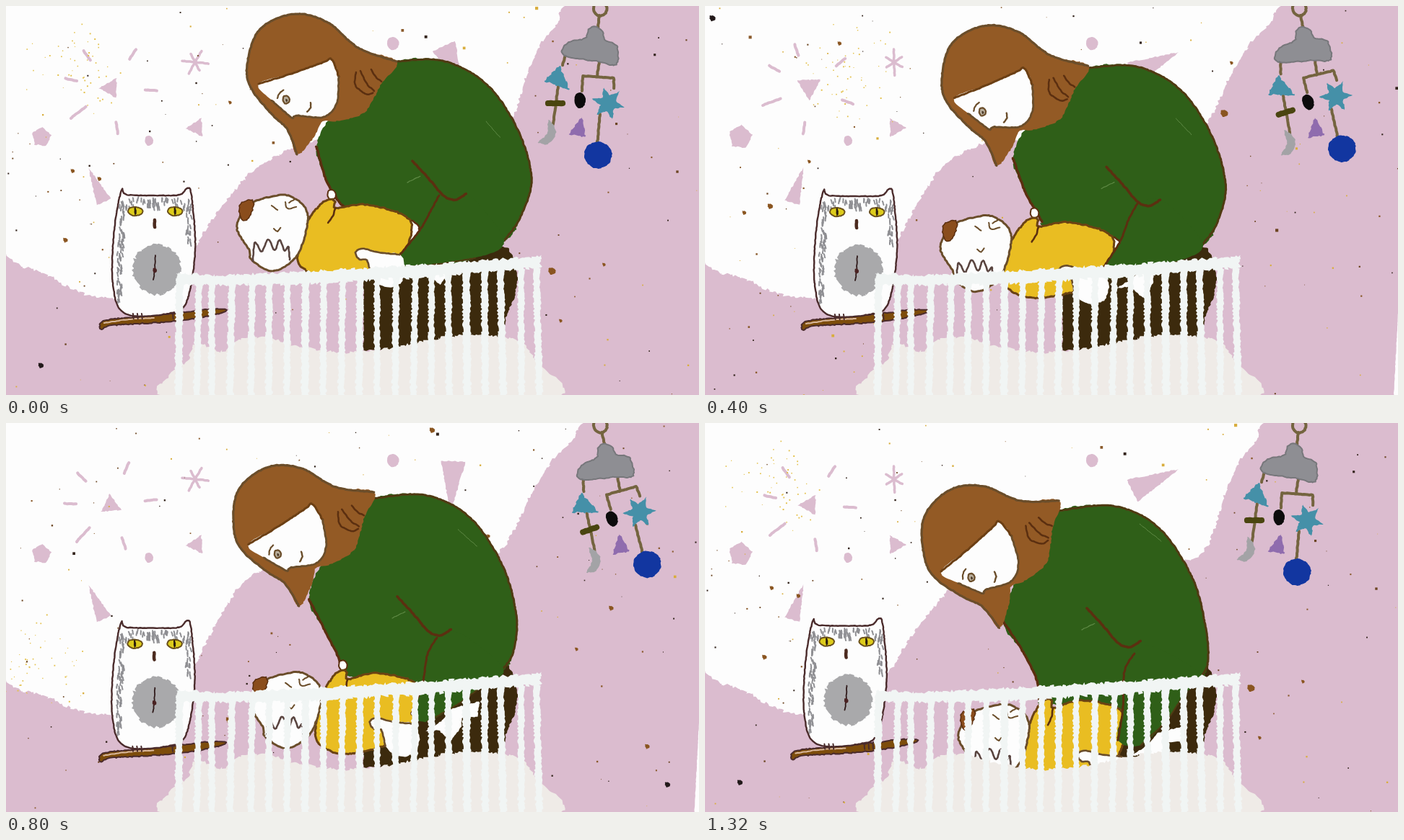
An HTML page with a canvas that plays this animation: 960 px wide and 540 px high, repeating every 1.36 s.

```html
<!DOCTYPE html>
<html lang="en">
<head>
<meta charset="utf-8">
<title>Bedtime</title>
<style>
html, body { margin: 0; width: 100%; height: 100%; overflow: hidden; background: #fdfdfd; }
canvas { display: block; width: 960px; height: 540px; }
</style>
</head>
<body>
<canvas id="stage" width="960" height="540"></canvas>
<script>
const LOOP = 1360, STEP = 40, RAD = Math.PI / 180;
const stage = document.getElementById('stage');
let ctx = stage.getContext('2d');

const C = {
  paper: '#fdfdfd', pink: '#dbbccf', hair: '#935a25', green: '#2f5f18', line: '#5b2f10',
  face: '#6a4d2a', yellow: '#e9bd22', dark: '#3c2a0d', rail: '#f1f5f4', sheet: '#efebe7',
  grey: '#8e8e93', cord: '#74643f', teal: '#4590a8', owl: '#4a2b2b', back: '#4f3a12', scratch: '#5f8a45'
};

// timing
const TIMES = [0, 240, 400, 640, 920, 1120, 1320];
const TRACK = {
  bend: [0, .1, .2, .45, .74, .89, 1],
  swing: [0, .41, .75, 1, .69, .29, 0],
  owlX: [0, 2, 4, 2.5, -3, -5.5, -10.5],
  owlY: [0, -2.5, 1, 15, 26.5, 26.5, 18.5]
};
function at(name, t) {
  const v = TRACK[name];
  let i = 0;
  while (i < TIMES.length - 2 && t >= TIMES[i + 1]) i++;
  const k = (t - TIMES[i]) / (TIMES[i + 1] - TIMES[i]);
  return v[i] + (v[i + 1] - v[i]) * k;
}
const nearest = t => TIMES.reduce((best, v, i) => Math.abs(v - t) <= Math.abs(TIMES[best] - t) ? i : best, 0);

// geometry
const hash = n => { const s = Math.sin(n * 12.9898 + 4.1) * 43758.5453; return s - Math.floor(s); };
function chunk(list, size) {
  const out = [];
  for (let i = 0; i < list.length; i += size) out.push(list.slice(i, i + size));
  return out;
}
const pairs = list => chunk(list, 2);
// entries: x, y at rest, then x, y when fully bent
const mix = (list, k) => chunk(list, 4).map(([x, y, u, v]) => [x + (u - x) * k, y + (v - y) * k]);
// linear bend around an anchor
const warp = (list, m, k) => pairs(list).map(([x, y]) => {
  const u = x - m.x, v = y - m.y;
  return [x + k * (m.dx + m.a * u + m.b * v), y + k * (m.dy + m.c * u + m.d * v)];
});
const ring = (n, x, y, radius, turn = 0) => Array.from({ length: n }, (_, i) => {
  const a = i * 2 * Math.PI / n + turn, r = radius(i);
  return [x + r * Math.cos(a), y + r * Math.sin(a)];
});

function trace(pts, closed, straight, rough) {
  const n = pts.length, last = closed ? n : n - 1;
  const get = i => closed ? pts[(i + n) % n] : pts[Math.max(0, Math.min(n - 1, i))];
  ctx.beginPath();
  for (let i = 0; i < last; i++) {
    const a = get(i - 1), b = get(i), c = get(i + 1), d = get(i + 2);
    const steps = Math.max(2, Math.ceil(Math.hypot(c[0] - b[0], c[1] - b[1]) / 2.5));
    for (let s = 0; s <= steps; s++) {
      if (s === steps && i < last - 1) break;
      const u = s / steps, p = [0, 1].map(j => {
        const jit = (hash(i * 97 + s * 2.3 + j * 31) - .5) * 2 * rough;
        if (straight) return b[j] + (c[j] - b[j]) * u + jit;
        return jit + .5 * (2 * b[j] + (c[j] - a[j]) * u
          + (2 * a[j] - 5 * b[j] + 4 * c[j] - d[j]) * u * u
          + (3 * b[j] - a[j] - 3 * c[j] + d[j]) * u * u * u);
      });
      ctx.lineTo(p[0], p[1]);
    }
  }
  if (closed) ctx.closePath();
}
function ink(color, w) {
  ctx.strokeStyle = color;
  ctx.lineWidth = w;
  ctx.lineCap = ctx.lineJoin = 'round';
  ctx.stroke();
}
function blob(pts, fill, { line, w = 3, rough = .8, straight = false } = {}) {
  trace(pts, true, straight, rough);
  ctx.fillStyle = fill;
  ctx.fill();
  if (line) ink(line, w);
}
const poly = (list, fill, opt) => blob(pairs(list), fill, { straight: true, ...opt });
const shape = (list, fill, opt) => blob(pairs(list), fill, opt);
function stroke(pts, color, w = 3, rough = .4) { trace(pts, false, false, rough); ink(color, w); }
const line = (list, color, w) => stroke(pairs(list), color, w);
const oval = (x, y, rx, ry, fill, opt) =>
  blob(ring(10, 0, 0, () => 1).map(([u, v]) => [x + rx * u, y + ry * v]), fill, { rough: .5, ...opt });
function placed(x, y, turn, paint) {
  ctx.save();
  ctx.translate(x, y);
  ctx.rotate(turn);
  paint();
  ctx.restore();
}

// wall
const EDGE = [
  -10,360, 22,362, 55,372, 90,392, 130,405, 190,400, 255,345, 278,308, 330,240, 370,211, 430,187,
  540,190, 660,191, 696,170, 721,98, 740,55, 764,25, 790,-4, 975,-6, 975,560, -10,560
];
function wall(q) {
  ctx.fillStyle = C.paper;
  ctx.fillRect(0, 0, 960, 540);
  blob(pairs(EDGE).map(([x, y]) => {
    if (y > 550 || x > 900) return [x, y];
    if (x < 130) return [x, y + q * 15 * (1 - x / 130)];
    if (x > 600) return [x + q * 30 * (1 - y / 140), y];
    return [x - q * Math.max(0, Math.min(35, (x - 270) * .33)), y];
  }), C.pink, { rough: 2 });
  poly([960, 540 - 150 * q, 962, 542, 960 - 8 * q, 542], C.paper, { rough: .3 });
}

// wall shapes hold one pose, then jump to the next
const POSE = [0, 1, 1, 2, 0, 1, 1];
const BIG = [66, 25, -25, 120, 93, 66, -25];
const SPIN = [0, 16, 17, 31, -10, 6, 0];
const RAYS = [-126, -57, -168, 3, 143, 81];
function spike(x, y, len, half, deg) {
  placed(x, y, deg * RAD, () => poly([-len * .4, -half, -len * .4, half, len * .6, 0], C.pink));
}
function shards(i) {
  const p = C.pink, wide = [2, 3, 6].includes(i), tall = [1, 2, 6].includes(i);
  const tri = (x, y, r, deg) => blob(ring(3, x, y, () => r, deg * RAD), p, { straight: true });
  blob(ring(5, 49, 182, () => wide ? 17 : 14, -1.45), p, { straight: true });
  if (i === 2 || i === 3) tri(144, 112, 19, 88);
  else tri(145, 114, 16, i === 4 ? -95 : 180);
  tri(264, 169, 15, [176, 0, -90][POSE[i]]);
  spike(127, 253, 52, 11, tall ? -72 : i === 3 ? 198 : -114);
  spike(618, 82, 72, 17, BIG[i]);
  oval(536, 52, 8.5, 9, p);
  oval(198, 187, 6, 7, p);
  for (let k = 0; k < 3; k++) {
    const a = k + (tall ? .55 : .1), l = (k === 1) === tall ? 18 : 13;
    const x = l * Math.cos(a), y = l * Math.sin(a);
    line([262 - x, 78 - y, 262 + x, 78 + y], p, 3.5);
  }
  RAYS.forEach((deg, k) => placed(145, 114, (deg + SPIN[i]) * RAD, () => {
    const h = k === 4 ? 13 : 8;
    line([56 - h, 0, 56 + h, 0], p, 4);
  }));
}

// paint speckles: x, y, radius; the first of each set is black
const SPOTS = [
  [48,499,4, 756,368,5.5, 82,325,3.5, 92,229,3, 129,240,3, 310,134,2.5, 828,359,2.5, 768,437,2.5],
  [10,17,4.5, 719,149,5.5, 90,278,4, 54,287,3, 186,52,3, 649,113,5, 144,216,2.5, 729,79,2.5],
  [916,502,4, 590,10,4, 838,257,3.5, 888,449,3.5, 308,412,4, 790,314,2.5, 668,157,2.5]
];
function speckles(set) {
  chunk(SPOTS[set], 3).forEach(([x, y, r], k) => oval(x, y, r, r * .85, k ? '#8a5520' : '#22191a', { rough: 1 }));
  const tones = ['#6b4420', '#33241c', '#d8ad3c', '#8a5a2b'];
  for (let k = 0; k < 160; k++) {
    const h = j => hash(set * 1000 + k * 5 + j), r = .8 + h(2) * (k % 9 ? 1.6 : 3.5);
    ctx.fillStyle = tones[Math.floor(h(3) * 4)];
    ctx.fillRect(h(0) * 960, h(1) * 540, r, r);
  }
  ctx.fillStyle = '#e3c04a';
  for (let k = 0; k < 50; k++) {
    const h = j => hash(set * 700 + k * 7 + j + .5);
    const x = [95, 200, 45][set], y = [88, 90, 330][set];
    ctx.fillRect(x + (h(0) + h(1) - 1) * 75, y + (h(2) + h(3) - 1) * 75, 1 + h(4), 1 + h(4));
  }
}

// everything hangs from the ring at 0, 0
function mobile(q) {
  placed(823, 3, -q * 23.7 * RAD, () => {
    oval(0, 1, 9.5, 9.5, 'transparent', { line: C.cord, w: 4 });
    [[-1,10, -3,28], [-47,63, -52,79], [-1,75, -4,93], [-25,115, -24,94, 19,97, 19,111],
     [-58,109, -61,130, -65,162], [0,147, -4,187]].forEach(l => {
      trace(pairs(l), false, true, .4);
      ink(C.cord, 4);
    });
    placed(-11, 54, q * .12, () => shape(
      [-39,11, -34,-6, -10,-12, -5,-25, 4,-28, 14,-21, 18,-9, 34,-2, 33,24, 8,20],
      C.grey, { line: '#77777b', w: 2 }));
    poly([-56,80, -78,101, -42,114], C.teal, { rough: 1.2 });
    line([-72,132, -52,132], '#4a4510', 8);
    shape([-71,155, -61,172, -71,188, -86,186, -74,175], '#a3a3a6');
    oval(-28, 128, 8, 11, '#0c0b0c');
    poly([-25,151, -44,175, -20,179], '#8f6cae', { rough: 1 });
    blob(ring(12, 11, 132, i => i % 2 ? 11 : 23, .25), C.teal, { straight: true });
    oval(-3, 204, 19.5, 18.5, '#1236a0', { rough: .9 });
  });
}

function owl(x, y) {
  placed(x, y, 0, () => {
    shape([130,445, 139,436, 200,430, 294,420, 297,427, 230,438, 150,443, 132,449], '#7d4d0b', { line: C.owl, w: 2 });
    line([136,440, 170,435, 205,433], '#d9b79c', 2);
    shape([160,256, 167,262, 205,263, 240,262, 251,253, 257,264, 262,340, 250,411, 225,427, 165,427, 148,385, 150,310],
      C.paper, { line: C.owl, w: 2.4, rough: .4 });
    for (let k = 0; k < 150; k++) {
      const u = hash(k + .3), v = hash(k * 3 + .7);
      let px = 250 + v * 6, py = 268 + u * 62;
      if (k < 75) [px, py] = [152 + 5 * (1 - u) + v * 8, 270 + u * 140];
      else if (k < 125) [px, py] = [164 + u * 86, 265 + v * (6 + 8 * Math.abs(Math.cos((u - .5) * 6.3)))];
      line([px, py, px + 3 * hash(k) - 1, py + 5], '#8f8f93', 2);
    }
    oval(209, 366, 34, 35, '#a9a9ab', { rough: 2.2 });
    for (const ex of [179, 234]) {
      oval(ex, 285, 10.5, 6, '#ddcc1c', { line: '#6a501b', w: 2 });
      oval(ex, 285, 1.8, 5.5, '#2c1d0c');
      for (let k = 0; k < 3; k++) line([ex - 3 + k * 6, 427, ex - 2 + k * 6, 434], C.owl, 2);
    }
    line([206,297, 206,307], '#4b2a1e', 4.5);
    line([207,346, 206,367, 204,380], '#2f1a1a', 1.8);
    oval(206, 367, 3, 3.5, '#4a2222');
  });
}

// mother
const NOD = { x: 350, y: 108, a: -.091, b: .33, c: -.353, d: -.009, dx: -23, dy: 98 };
const TORSO = [
  541,77,489,122, 605,76,565,115, 665,108,628,145, 708,170,675,215, 728,240,694,287, 712,294,696,335,
  690,326,680,360, 600,358,600,400, 478,290,475,390, 468,278,463,385, 460,270,460,358, 443,240,442,320,
  430,195,413,275, 452,152,434,212, 500,110,470,160
];
const HAIR = [
  541,77, 488,58, 446,23, 400,11, 353,31, 335,75, 338,111, 368,150, 390,172, 403,206,
  428,180, 438,160, 456,160, 496,148, 520,108
];
const FACE = [350,108, 398,93, 440,78, 451,74, 461,98, 458,135, 440,154, 402,152, 397,156, 387,148, 368,131];
const ARM = [
  600,263,595,320, 588,285,581,345, 574,310,579,395, 545,346,572,440, 551,362,604,447, 600,358,640,412,
  650,350,664,376, 690,326,688,350, 640,262,620,310
];
function mother(k) {
  const torso = mix(TORSO, k), hair = warp(HAIR, NOD, k), face = warp(FACE, NOD, k);
  const mark = (list, color, w) => stroke(warp(list, NOD, k), color, w);
  blob(torso, C.green, { rough: 1 });
  stroke(torso.slice(0, 7), C.back);
  stroke(torso.slice(9, 13), C.line, 3.5);
  stroke(mix([665,160,602,140, 684,182,632,164], k), C.scratch, 1);
  blob(hair, C.hair);
  stroke(hair.slice(0, 10), C.face, 3.2);
  mark([485,92, 484,110, 498,122, 508,121], C.line, 2.5);
  mark([491,90, 500,108, 510,118], C.line, 2.5);
  mark([506,88, 512,98, 520,105], C.line, 2.5);

  blob(face, C.paper, { rough: .3 });
  stroke(face.slice(0, 5), '#6b3f14');
  stroke(face.slice(4), C.face, 2.8);
  const [[ex, ey]] = warp([388,130], NOD, k);
  oval(ex, ey, 4.8, 5.5, '#b9ae9c', { line: C.face, w: 2.2 });
  oval(ex + .5, ey + 1, 1.6, 2, '#4b3a28');
  mark([376,128, 379,121, 384,117], C.face, 2.2);
  mark([422,134, 422,141, 417,147], C.face, 2.4);
}
function arm(k) {
  placed(-24 * (1 - k), -88 * (1 - k), 0, () =>
    poly([590,462, 612,448, 628,430, 665,420, 662,442, 640,444, 640,456, 625,475, 608,460], C.paper));
  const a = mix(ARM, k);
  blob(a, C.green, { rough: .6 });
  stroke(a.slice(0, 4), C.line);
  stroke(a.slice(4, 7), C.back, 2);
  placed(-34 * k, 42 * k, 0, () => {
    line([563,215, 585,239, 606,263, 622,269, 637,261], C.line, 3.6);
    line([556,245, 574,236], C.scratch, 1.2);
  });
  placed(32 * k, 118 * k, 0, () => {
    const h = pairs([506,376, 500,353, 490,352, 484,342, 494,337, 515,342, 545,345, 553,365, 546,385, 525,390]);
    blob(h, C.paper);
    stroke(h.slice(0, 7), C.face, 2.6);
  });
}

// baby
const SINK = { x: 404, y: 348, a: -.08, b: .12, c: -.12, d: .1, dx: 38, dy: 128 };
const BODY = [404,348, 416,302, 440,272, 455,270, 457,281, 500,276, 560,298, 545,352, 500,371, 445,377, 414,366];
function baby(k) {
  const low = k + .04 * Math.sin(Math.PI * k);
  const part = list => warp(list, SINK, low);
  blob(part([560,299, 572,307, 571,322, 555,332]), C.paper, { line: C.line, w: 2.5 });
  const [[px, py]] = part([451,262]);
  oval(px, py, 6, 7, C.paper, { line: C.line, w: 2 });
  blob(part(BODY), C.yellow, { line: '#6b4313' });
  stroke(part([456,281, 453,291, 446,301]), C.line, 2.6);

  placed(31 * k, 128 * low, 0, () => {
    shape([335,277, 370,264, 396,265, 418,290, 404,345, 370,368, 340,352, 337,339, 320,308],
      C.paper, { line: C.face, rough: .5 });
    shape([324,276, 341,269, 342,281, 335,295, 326,297], '#8a4d1c', { line: C.line, w: 1.5 });
    [[368,277, 376,283], [387,272, 390,281, 402,279], [371,309, 376,313, 380,308], [399,269, 392,273]]
      .forEach(l => line(l, C.face, 2));
    line([342,354, 345,328, 354,341, 363,324, 372,339, 379,325, 386,340, 391,334, 393,352], '#5a4540', 2.6);
  });
}

// the crib never moves, so it is painted once
function crib() {
  shape([243,550, 254,488, 264,469, 300,479, 320,465, 358,460, 420,475, 500,480, 620,458, 700,462, 732,490, 738,550],
    C.sheet, { rough: 2 });
  for (let i = 0; i <= 20; i++) {
    const x = 239 + 25 * i - (i === 2 || i === 3 ? 4 : 0), top = 380 - i * 1.1;
    const lean = (hash(i * 3) - .5) * 5 + (i > 14 ? -3 : 2), w = 4.2 + hash(i + 9) * 1.2;
    poly([x + lean - w, top, x + lean + w, top, x + w, 545, x - w, 545], C.rail, { rough: 1.3 });
  }
  poly([236,371, 300,374, 400,369, 600,358, 740,347, 741,363, 600,375, 400,387, 237,387], C.rail, { rough: 2.2 });
}
const cribLayer = document.createElement('canvas');
cribLayer.width = 960;
cribLayer.height = 540;
const main = ctx;
ctx = cribLayer.getContext('2d');
crib();
ctx = main;

function draw(t) {
  const swing = at('swing', t), bend = at('bend', t), hold = nearest(t);
  wall(swing);
  shards(hold);
  speckles([0, 0, 1, 1, 2, 0, 0][hold]);
  mobile(swing);
  owl(at('owlX', t), at('owlY', t));
  poly([495,368, 495,478, 688,474, 692,432, 704,406, 709,380, 704,352, 696,336, 680,333, 640,346], C.dark, { rough: 1 });
  mother(bend);
  baby(bend);
  arm(bend);
  ctx.drawImage(cribLayer, 0, 0);
}

const start = performance.now();
let shown = -1;
function tick() {
  const t = Math.floor((performance.now() - start) % LOOP / STEP) * STEP;
  if (t !== shown) draw(shown = t);
  requestAnimationFrame(tick);
}
tick();
</script>
</body>
</html>
```
